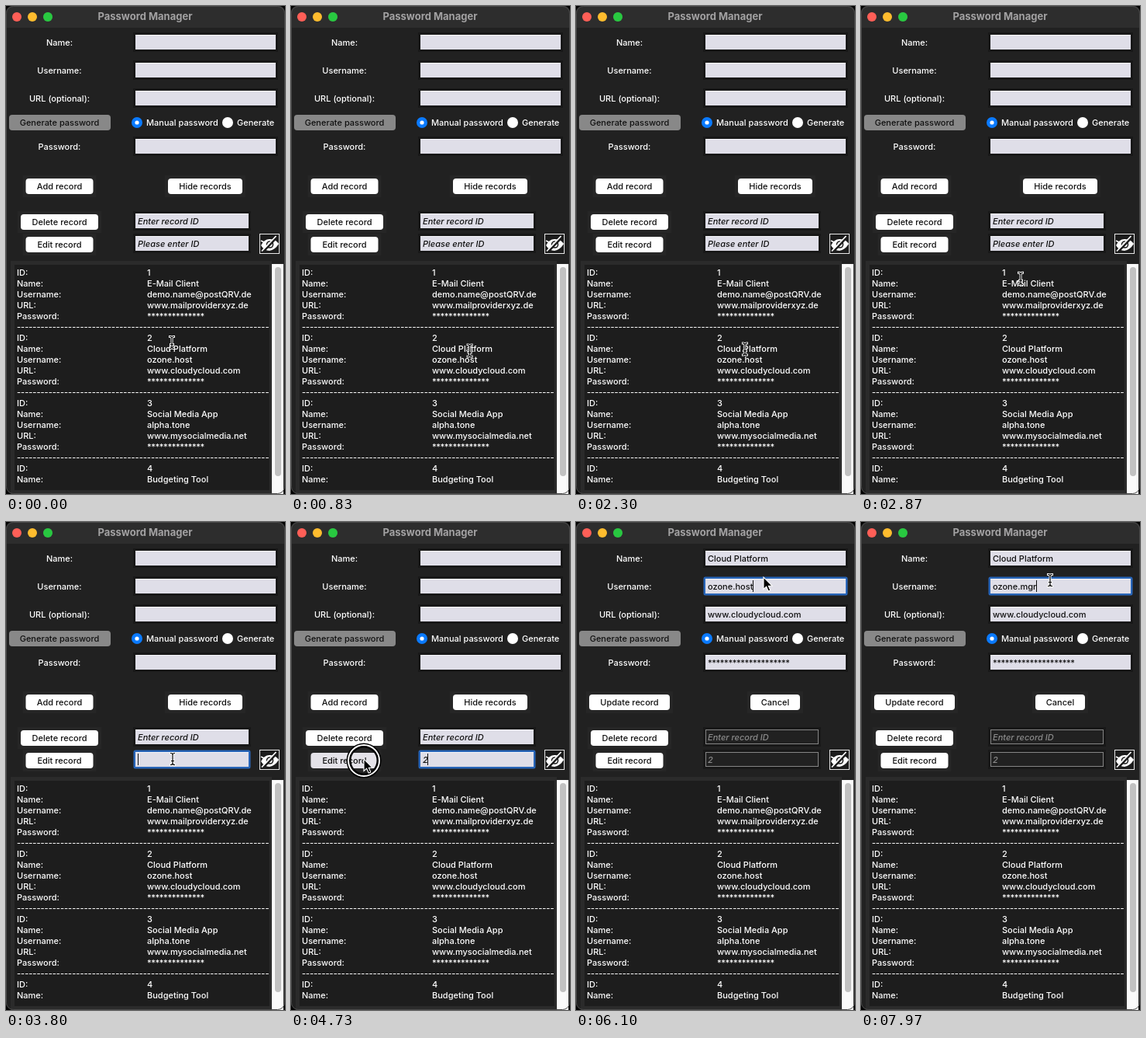
Recreate the animation shown at these times as an HTML page. Size 360x628 px, loop 8000 ms.

```html
<!DOCTYPE html>
<html lang="en">
<head>
<meta charset="utf-8">
<title>Password Manager</title>
<style>
html, body { margin: 0; width: 100%; height: 100%; overflow: hidden; background: #000; }
svg { display: block; width: 360px; height: 628px; }
text { font: 500 11px Inter, "Liberation Sans", sans-serif; fill: #fff; white-space: pre; }
.title { font-weight: 700; font-size: 13px; fill: #a3a2a3; }
.dark { fill: #111; }
.dim { fill: #8b8b8b; }
.italic { font-style: italic; }
.mid { text-anchor: middle; }
.stars { letter-spacing: -.45px; }
</style>
</head>
<body>
<svg viewBox="0 0 360 628">
  <defs><clipPath id="pane"><rect x="11" y="333" width="329" height="290"/></clipPath></defs>
  <g id="base"></g>
  <g id="form"></g>
  <circle id="halo" r="19.5" fill="none" stroke="#000" stroke-width="6"/>
  <circle id="ring" r="20" fill="none" stroke="#fff" stroke-width="2"/>
  <g id="beam" fill="none" stroke-linecap="square">
    <path d="M-2.5-7.5Q0-7.5 0-5.5Q0-7.5 2.5-7.5M0-5.5V5.5M-2.5 7.5Q0 7.5 0 5.5Q0 7.5 2.5 7.5M-1.5 2.5H1.5" stroke="#fff" stroke-width="3"/>
    <path d="M-2.5-7.5Q0-7.5 0-5.5Q0-7.5 2.5-7.5M0-5.5V5.5M-2.5 7.5Q0 7.5 0 5.5Q0 7.5 2.5 7.5M-1.5 2.5H1.5" stroke="#000" stroke-width="1.2"/>
  </g>
  <path id="arrow" d="M0 0V15.5L3.6 12.2L6.2 18L8.8 16.9L6.3 11.2H11Z" fill="#000" stroke="#fff" stroke-width="1.1"/>
</svg>
<script>
const $ = id => document.getElementById(id);
const LOOP = 8000, DOMAIN_USER = 'ozone.';

const text = (x, y, s, cls = '') => `<text x="${x}" y="${y}" class="${cls}">${s}</text>`;
const rect = (x, y, w, h, fill, more = '') =>
  `<rect x="${x}" y="${y}" width="${w}" height="${h}" fill="${fill}" ${more}/>`;
const dot = (x, y, r, fill) => `<circle cx="${x}" cy="${y}" r="${r}" fill="${fill}"/>`;

function button(cx, y, w, label, fill = '#fff') {
  const x = cx - w / 2;
  return rect(x - 4, y - 4, w + 8, 28, '#262626') + rect(x, y, w, 20, fill, 'rx="4"') +
    text(cx, y + 14, label, 'mid dark');
}

function field(y, w, value, { cls = '', focus, off } = {}) {
  const box = off
    ? rect(167.5, y + .5, w - 1, 18, '#212121', 'stroke="#858585"')
    : rect(167, y, w, 19, '#dfdee8') + rect(167, y, w, 1, '#f6f6fa');
  const edge = focus
    ? rect(166, y - 1, w + 2, 21, 'none', 'rx="1" stroke="#2865b8" stroke-width="3"')
    : rect(165.5, y - 1.5, w + 3, 22, 'none', 'stroke="#181818" stroke-width="3"');
  return edge + box + text(170, y + 14, value, cls + (off ? ' dim' : ' dark'));
}

function eye() {
  return rect(327.5, 293.5, 25, 25, '#1c1c1c', 'stroke="#e8e8e8"') +
    `<path d="M329 308Q334 299 341 300Q348 300 352 306Q347 314 340 315Q333 315 329 308Z" fill="#fff"/>
     <circle cx="340.5" cy="307" r="4" fill="none" stroke="#1c1c1c" stroke-width="1.6"/>
     <path d="M331 317L350 297" stroke="#1c1c1c" stroke-width="3"/>
     <path d="M330 315.5L348.5 296M329 302L333 304" stroke="#fff" stroke-width="1.8"/>`;
}

const records = [
  ['E-Mail Client', 'demo.name@postQRV.de', 'www.mailproviderxyz.de'],
  ['Cloud Platform', DOMAIN_USER + 'host', 'www.cloudycloud.com'],
  ['Social Media App', 'alpha.tone', 'www.mysocialmedia.net'],
  ['Budgeting Tool']
];

function list() {
  const keys = ['ID:', 'Name:', 'Username:', 'URL:', 'Password:'];
  return records.map((rec, n) => {
    const top = 347 + 84 * n;
    const values = [n + 1, ...rec];
    const full = rec.length > 1;
    if (full) values.push('*'.repeat(14));
    return values.map((v, i) => text(14, top + 14 * i, keys[i]) +
      text(182, top + 14 * i, v, i == 4 ? 'stars' : '')).join('') +
      (full ? text(14, top + 70, '-'.repeat(75)) : '');
  }).join('');
}

function base() {
  const labels = ['Name:', 'Username:', 'URL (optional):', 'Password:'];
  return rect(0, 0, 360, 628, '#212121', 'rx="9"') +
    `<path d="M0 28V9Q0 0 9 0H351Q360 0 360 9V28Z" fill="#2d2d2d"/>` +
    dot(14, 14, 6, '#ff5f57') + dot(34, 14, 6, '#febc2e') + dot(54, 14, 6, '#4a494a') +
    dot(54, 14, 6, '#28c840') + text(179.5, 18, 'Password Manager', 'title mid') +
    labels.map((s, i) => text(69, [51, 87, 123, 185][i], s, 'mid')).join('') +
    rect(4, 140, 131, 20, '#888', 'rx="4"') + text(69, 154, 'Generate password', 'mid dark') +
    dot(169, 150, 7, '#0a7aff') + dot(169, 150, 2.6, '#fff') + text(181, 154, 'Manual password') +
    dot(286, 150, 7, '#fff') + text(298, 154, 'Generate') +
    eye() +
    rect(6, 328, 337, 300, '#2b2b2b') + rect(11, 333, 329, 290, '#1d1d1d') +
    `<g clip-path="url(#pane)">${list()}</g>` +
    rect(343, 332, 15, 296, '#fafafa') + rect(347, 336, 8, 269, '#c1c1c1', 'rx="4"') +
    rect(.5, .5, 359, 627, 'none', 'rx="9" stroke="#484848"');
}

// Time at which each edit of the user name takes effect
const edits = [[0, 'host'], [6450, 'hos'], [6600, 'ho'], [6740, 'h'], [6900, ''],
  [7300, 'm'], [7630, 'mg'], [7840, 'mgr']];
const userAt = t => DOMAIN_USER + edits.filter(e => e[0] <= t).pop()[1];

const clicks = [[3540, 3720], [4620, 4760], [5940, 6070]];
const pressed = t => clicks.some(([a, b]) => t >= a && t < b);

function form(t) {
  const editing = t >= 4830, idFocus = t >= 3560 && !editing, userFocus = t >= 5960;
  const id = t < 3560 ? 'Please enter ID' : t < 4060 ? '' : '2';
  const off = editing;
  return field(37, 181, editing ? 'Cloud Platform' : '') +
    field(73, 181, editing ? userAt(t) : '', { focus: userFocus, cls: 'user' }) +
    field(109, 181, editing ? 'www.cloudycloud.com' : '') +
    field(171, 181, editing ? '*'.repeat(20) : '', { cls: 'stars' }) +
    (editing ? button(69, 222, 104, 'Update record') + button(257, 222, 64, 'Cancel')
             : button(69, 222, 87, 'Add record') + button(257, 222, 96, 'Hide records')) +
    button(69, 268, 100, 'Delete record') +
    button(69, 297, 87, 'Edit record', t > 4000 && t < 4830 && pressed(t) ? '#e4e2e8' : '#fff') +
    field(267, 146, 'Enter record ID', { cls: 'italic', off }) +
    field(296, 146, id, { cls: 'italic id', off, focus: idFocus }) +
    (idFocus || userFocus ? rect(0, idFocus ? 298 : 75, 1, 15, '#111', 'id="caret"') : '');
}

// Pointer track: time, x, y
const track = [[0, 214, 433], [700, 228, 440], [1200, 238, 453], [1700, 219, 447], [2100, 223, 451],
  [2500, 213, 432], [2870, 206, 351], [3030, 209, 314], [3370, 209, 314], [3530, 215, 305],
  [4090, 215, 305], [4200, 190, 305], [4420, 120, 306], [4600, 94, 305], [5090, 94, 305],
  [5250, 112, 280], [5650, 218, 112], [5800, 238, 80], [5900, 242, 72], [6100, 242, 71],
  [6600, 243, 73], [7600, 244, 75], [8000, 244, 75]];

function pointer(t) {
  const i = track.findIndex(k => k[0] > t);
  const [a, b] = [track[i - 1], track[i]], k = (t - a[0]) / (b[0] - a[0]);
  return [a[1] + (b[1] - a[1]) * k, a[2] + (b[2] - a[2]) * k];
}

function overText(x, y, t) {
  if (y > 332) return x < 340;
  const inside = (top, right) => x > 166 && x < right && y > top && y < top + 19;
  return [37, 73, 109, 171].some(v => inside(v, 348)) ||
    (t < 4830 && [267, 296].some(v => inside(v, 313)));
}

let last = '';
function draw(t) {
  const html = form(t);
  if (html !== last) {
    $('form').innerHTML = last = html;
    const caret = $('caret');
    if (caret) {
      const entry = document.querySelector(t < 4830 ? '.id' : '.user');
      caret.setAttribute('x', Math.round(169.5 + entry.getComputedTextLength()));
    }
  }
  const [x, y] = pointer(t), beam = overText(x, y, t), down = pressed(t);
  const show = (id, on, dy = 0) => {
    $(id).setAttribute('visibility', on ? 'visible' : 'hidden');
    $(id).setAttribute('transform', `translate(${x} ${y + dy})`);
  };
  show('beam', beam);
  show('arrow', !beam);
  show('halo', down, beam ? 0 : 2);
  show('ring', down, beam ? 0 : 2);
}

$('base').innerHTML = base();
const start = performance.now();
function tick() {
  draw((performance.now() - start) % LOOP);
  requestAnimationFrame(tick);
}
tick();
</script>
</body>
</html>
```
